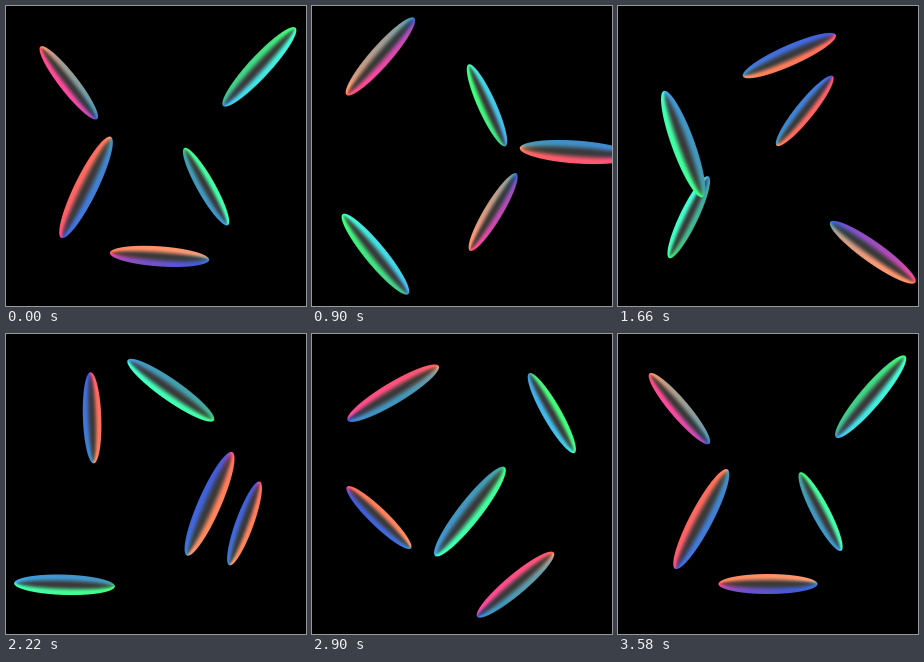
These frames come from a looping animation (300 px wide and 300 px high, 3600 ms). An HTML page with a canvas:

```html
<!DOCTYPE html>
<html lang="en">
<head>
<meta charset="utf-8">
<title>Orbiting spindles</title>
<style>
html, body { margin: 0; width: 100%; height: 100%; overflow: hidden; background: #000; }
canvas { display: block; width: 100vw; height: 100vh; }
</style>
</head>
<body>
<canvas id="stage" width="300" height="300"></canvas>
<script>
const SIZE = 300, LOOP = 3600, STEP = 20, TAU = Math.PI * 2, COUNT = 5;
const RADIUS = 100, CAMERA = 800, LONG = 49.5, SHORT = 10, CORE = 58;

const clamp = (value, low, high) => Math.min(high, Math.max(low, value));
const smooth = (low, high, value) => {
  const t = clamp((value - low) / (high - low), 0, 1);
  return t * t * (3 - 2 * t);
};

// A rim channel swells towards one direction, in radians from the light.
const wave = (mean, swing, peak) => angle =>
  clamp(mean + swing * Math.cos(angle - peak), 65, 255);
const WARM = [wave(200, 190, -0.17), wave(115, 42, 1.57), wave(155, 65, -2.97)];
const COOL = [wave(65, 0, 0), wave(225, 75, 1.66), wave(178, 55, -2.62)];

const ctx = document.getElementById("stage").getContext("2d");
const image = ctx.createImageData(SIZE, SIZE);
const pixels = image.data;

function place(k, turn) {
  const shift = k * TAU / COUNT;
  const x = Math.sin(turn - 2 * shift);
  const y = Math.cos(turn + shift);
  const z = Math.sin(turn + shift);
  const scale = CAMERA / (CAMERA - RADIUS * z);
  return {
    x: SIZE / 2 + RADIUS * scale * x,
    y: SIZE / 2 + RADIUS * scale * y,
    z, scale,
    angle: Math.atan2(x, y) + turn,
    rim: k === 2 || k === 4 ? COOL : WARM
  };
}

function drawSpindle(body, light) {
  const a = LONG * body.scale, b = SHORT * body.scale;
  const c = Math.cos(body.angle), s = Math.sin(body.angle);
  const w = Math.hypot(a * c, b * s) + 1, h = Math.hypot(a * s, b * c) + 1;
  const left = Math.max(0, Math.floor(body.x - w)), right = Math.min(SIZE - 1, Math.ceil(body.x + w));
  const top = Math.max(0, Math.floor(body.y - h)), bottom = Math.min(SIZE - 1, Math.ceil(body.y + h));

  for (let py = top; py <= bottom; py++) {
    for (let px = left; px <= right; px++) {
      const dx = px + 0.5 - body.x, dy = py + 0.5 - body.y;
      const u = (dx * c + dy * s) / a, v = (dy * c - dx * s) / b;
      const q = Math.hypot(u, v);
      const nu = u / a, nv = v / b, flat = Math.hypot(nu, nv) || 1e-9;
      const cover = clamp(0.5 - (q - 1) * q / flat, 0, 1);
      if (!cover) continue;

      const nz = Math.sqrt(Math.max(0, 1 - q * q)) / b;
      const glow = smooth(0.05, 0.75, flat / Math.hypot(flat, nz));
      const facing = Math.atan2(nv, nu) + body.angle - light;
      const at = (py * SIZE + px) * 4;
      body.rim.forEach((channel, n) => {
        const colour = CORE + (channel(facing) - CORE) * glow;
        pixels[at + n] += (colour - pixels[at + n]) * cover;
      });
    }
  }
}

function draw(now) {
  const time = Math.floor(now % LOOP / STEP) * STEP;
  const turn = (time + STEP) / LOOP * TAU;
  for (let i = 0; i < pixels.length; i++) pixels[i] = i % 4 === 3 ? 255 : 0;
  Array.from({ length: COUNT }, (_, k) => place(k, turn))
    .sort((p, q) => p.z - q.z)
    .forEach(body => drawSpindle(body, TAU * 0.625 - turn));
  ctx.putImageData(image, 0, 0);
}

let start;
function tick(now) {
  start ??= now;
  draw(now - start);
  requestAnimationFrame(tick);
}
draw(0);
requestAnimationFrame(tick);
</script>
</body>
</html>
```
